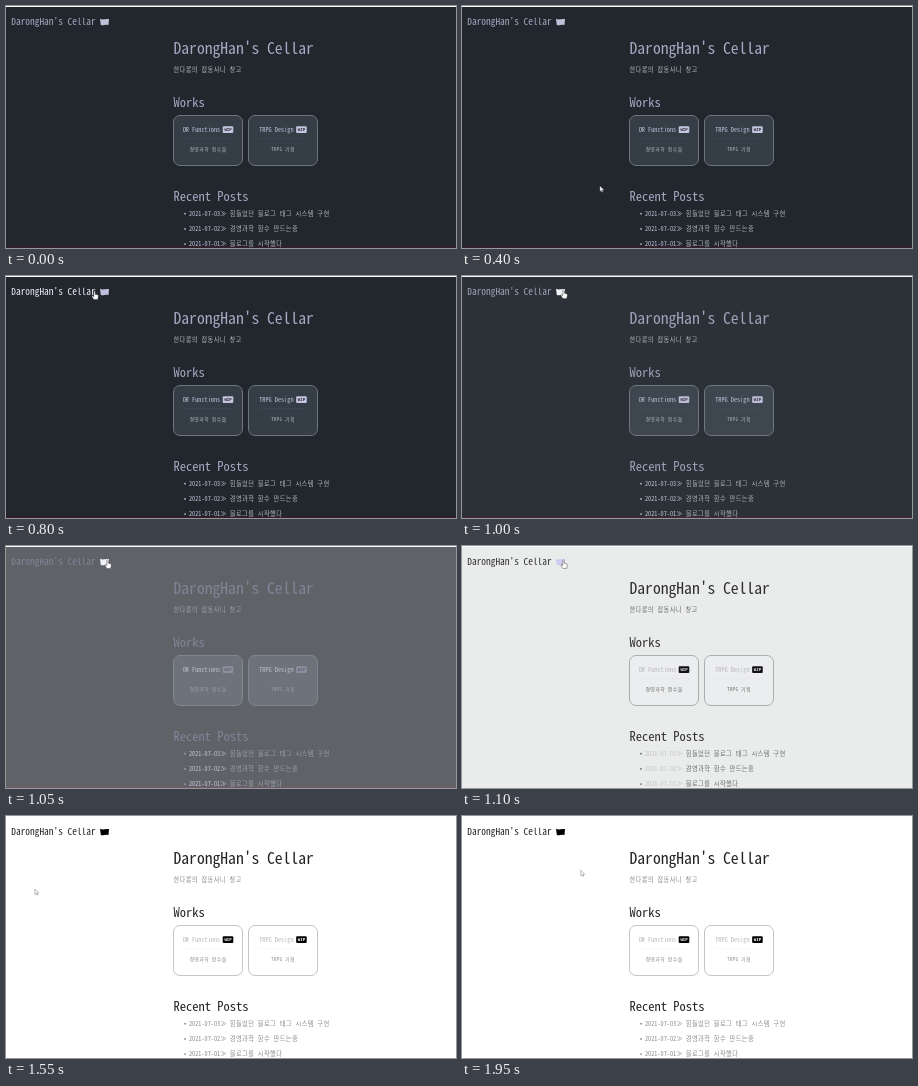
An HTML page that plays this animation: 450 px wide and 242 px high, repeating every 2000 ms.

```html
<!DOCTYPE html>
<html lang="ko">
<head>
<meta charset="utf-8">
<title>DarongHan's Cellar</title>
<style>
html, body { margin: 0; width: 100%; height: 100%; overflow: hidden; }
svg { display: block; width: 100vw; height: 100vh; }
text {
  font-family: "Noto Sans Mono CJK KR", "Noto Sans CJK KR", "Noto Sans CJK", monospace;
  font-size: 6.25px;
  white-space: pre;
}
.bg { fill: var(--bg); }
.head { fill: var(--head); font-size: 12.5px; }
.title { font-size: 15.6px; }
.nav { fill: var(--nav); font-size: 9.38px; }
.body { fill: var(--body); letter-spacing: .06em; }
.small { font-size: 5px; }
.link { fill: var(--link); }
.date { fill: var(--date); }
.card { fill: var(--card); stroke: var(--edge); }
.rule { stroke: var(--rule); stroke-width: .5; }
.badge { fill: var(--badge); }
.wip { fill: var(--bg); font: 700 4px "DejaVu Sans Mono", monospace; }
.icon { fill: var(--icon); }
.foot { fill: var(--foot); }
</style>
</head>
<body>
<svg id="stage" viewBox="0 0 450 242" preserveAspectRatio="none">
  <rect class="bg" width="450" height="242"/>
  <rect width="450" height="1" fill="#fbfbfb"/>
  <rect class="foot" y="240.6" width="450" height="1.4"/>
  <text class="nav" x="5.3" y="18.9">DarongHan's Cellar</text>
  <path class="icon" d="M94 12.7Q96 13.8 98.4 13.3Q101 12.7 103 13L102.5 19Q100.5 18.4 98.4 18.9Q96.4 19.4 94.8 18.9Z"/>
  <text class="head title" x="167.5" y="47.6">DarongHan's Cellar</text>
  <text class="body" x="167.5" y="66.2">한다롱의 잡동사니 창고</text>
  <text class="head" x="167.5" y="101.1">Works</text>
  <g id="cards"></g>
  <text class="head" x="167.5" y="195.3">Recent Posts</text>
  <g id="posts"></g>
  <g id="cursor" stroke-width=".5" stroke-linejoin="round" fill="#fff">
    <path id="hand" stroke="#444" d="M-.7 .6Q0-.4.7.6V3.4L3 3.9Q4 4.2 3.8 5.4L3.2 8.6H-.7L-2.6 5.6Q-2.6 4.6-1.6 5L-.7 5.8Z"/>
    <path id="arrow" stroke="#777" d="M0 0V5.4L1.3 4.3L2.1 6.2L3 5.8L2.2 4H3.8Z"/>
  </g>
</svg>
<script>
const $ = id => document.getElementById(id);
const LOOP = 2000, STEP = 50;

// Card titles and badges are centred as one row
const CHAR = 3.125, BADGE = 10.6, GAP = 2.5;
$('cards').innerHTML = [
  ['OR Functions', '경영과학 함수들'],
  ['TRPG Design', 'TRPG 기획']
].map(([name, note], i) => {
  const x = 167.5 + 75 * i, mid = x + 34.5;
  const left = mid - (name.length * CHAR + GAP + BADGE) / 2;
  const bx = left + name.length * CHAR + GAP;
  return `<rect class="card" x="${x}" y="109.5" width="69" height="50" rx="6.5"/>
  <text class="link" x="${left}" y="125.6">${name}</text>
  <rect class="badge" x="${bx}" y="120.3" width="${BADGE}" height="6.6" rx="1"/>
  <text class="wip" x="${bx + BADGE / 2}" y="125.1" text-anchor="middle">WIP</text>
  <path class="rule" d="M${x + 9} 132.4h51"/>
  <text class="body small" x="${mid}" y="144.6" text-anchor="middle">${note}</text>`;
}).join('');

$('posts').innerHTML = [
  '힘들었던 블로그 태그 시스템 구현',
  '경영과학 함수 만드는중',
  '블로그를 시작했다'
].map((title, i) => {
  const y = 209.7 + i * 15.2;
  return `<circle class="body" cx="179" cy="${y - 2}" r=".9"/>
  <text class="date" x="183" y="${y}">2021-07-0${3 - i}≫</text>
  <text class="body" x="223.8" y="${y}">${title}</text>`;
}).join('');

const ramp = (t, from, to) => Math.min(1, Math.max(0, (t - from) / (to - from)));
const lerp = (a, b, u) => a + (b - a) * u;
const rgb = hex => [1, 3, 5].map(i => parseInt(hex.slice(i, i + 2), 16));
function mix(a, b, u) {
  const q = rgb(b);
  return `rgb(${rgb(a).map((v, i) => Math.round(lerp(v, q[i], u)))})`;
}

// [dark, light, light once settled]
const THEME = {
  bg: ['#22272e', '#ffffff'],
  head: ['#a8a8c4', '#222222'],
  nav: ['#a8a8c4', '#222222'],
  body: ['#b4b8be', '#666666', '#8a8a8a'],
  card: ['#353d47', '#ffffff'],
  edge: ['#6c757e', '#b4b4b4', '#c4c4c4'],
  rule: ['#414a54', '#eeeeee'],
  badge: ['#c4c4e0', '#000000'],
  link: ['#c4c4de', '#b8b8b8'],
  date: ['#c8c8de', '#c4c4c4', '#888888'],
  icon: ['#c0c0dc', '#d0ccf4'],
  foot: ['#35202a', '#ffffff']
};

function pointer(t) {
  if (t < 600) {
    const u = ramp(t, 400, 600);
    return [lerp(138, 73, u), lerp(16.3, 180, (1 - u) ** 1.4)];
  }
  if (t < 1450) {
    const u = ramp(t, 600, 900) ** 1.5;
    return [lerp(73, 101.5, u), lerp(16.3, 13.8, u)];
  }
  const u = ramp(t, 1450, 1950), a = u * 2 * Math.PI, lift = 1 - Math.cos(a);
  return [
    lerp(101.5, 118.8, u) - 88 * Math.sin(a) + 11 * lift,
    lerp(13.8, 54.3, u) + 74 * lift
  ];
}

function draw(t) {
  const style = $('stage').style;
  const set = (name, value) => style.setProperty('--' + name, value);
  const fade = ramp(t, 930, 1105) ** 3.4, settle = ramp(t, 1150, 1450);
  for (const name in THEME) {
    const [dark, light, calm = light] = THEME[name];
    set(name, settle ? mix(light, calm, settle) : mix(dark, light, fade));
  }
  if (t < 900) set('nav', mix(THEME.nav[0], '#eeeefa', ramp(t, 550, 620) * ramp(t, 900, 800)));
  if (t < 1100) set('icon', mix(THEME.icon[0], '#f2f2fa', ramp(t, 800, 900)));
  if (t >= 1500) set('icon', '#000000');

  const pointing = t >= 600 && t < 1500;
  $('cursor').setAttribute('transform', `translate(${pointer(t)})`);
  $('cursor').style.display = t < 400 ? 'none' : '';
  $('hand').style.display = pointing ? '' : 'none';
  $('arrow').style.display = pointing ? 'none' : '';
}

const start = performance.now();
function tick() {
  const t = (performance.now() - start) % LOOP;
  draw(Math.floor(t / STEP) * STEP);
  requestAnimationFrame(tick);
}
tick();
</script>
</body>
</html>
```
